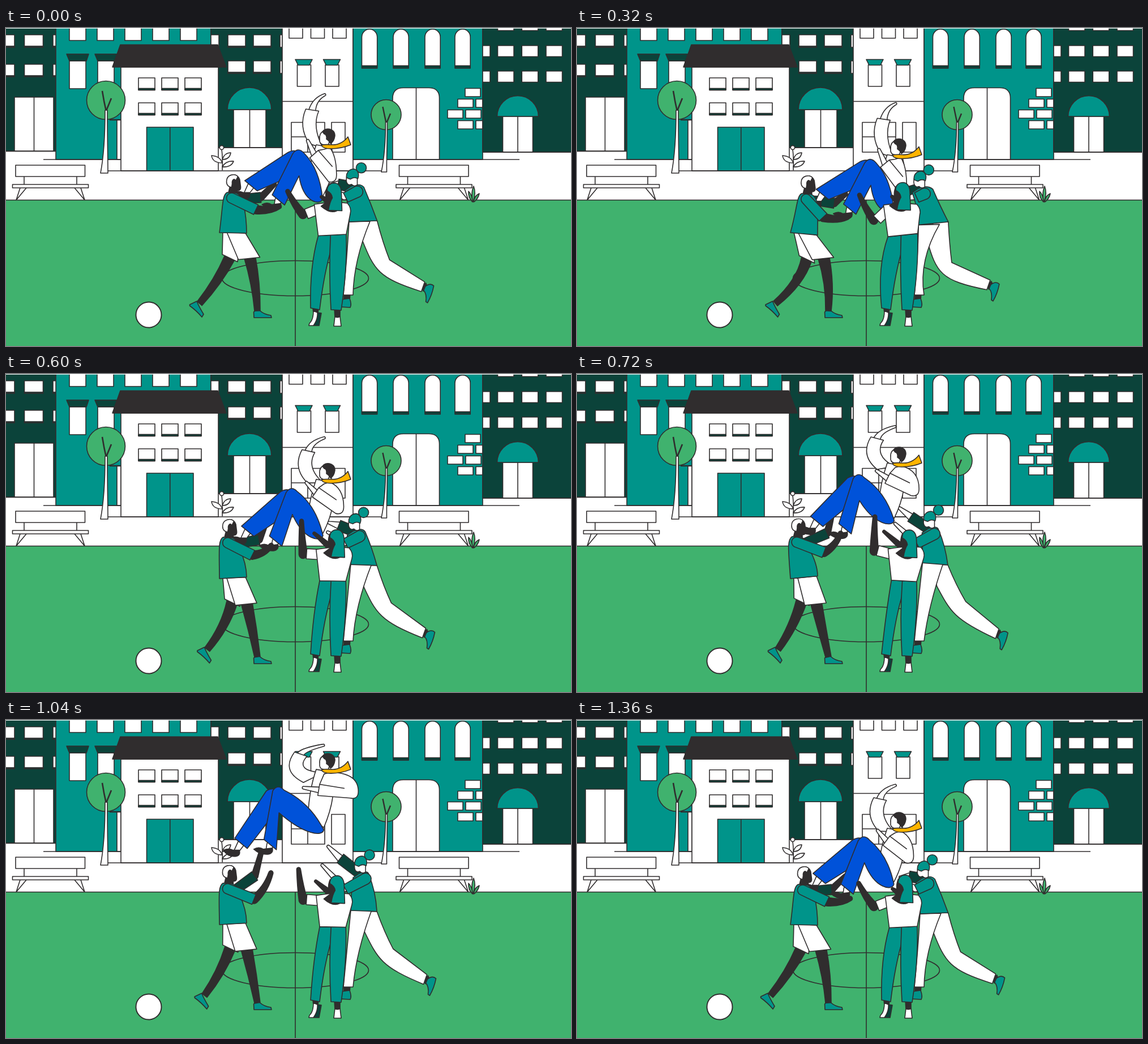
An HTML page that plays this animation: 998 by 561 pixels, repeating every 1.4 s.

```html
<!DOCTYPE html>
<html lang="en">
<head>
<meta charset="utf-8">
<title>Team celebration</title>
<style>
html, body { margin: 0; width: 100%; height: 100%; overflow: hidden; background: #fff; }
svg { display: block; width: 100%; height: 100%; }
path, circle, ellipse { stroke: #302d2e; stroke-width: 1.6; stroke-linejoin: round; }
</style>
</head>
<body>
<svg id="stage" viewBox="0 0 998 561"></svg>
<script>
const stage = document.getElementById('stage');
const WHITE = '#fff', TEAL = '#00948a', DEEP = '#0b433a', DARK = '#302d2e';
const GREEN = '#40b26e', BLUE = '#0052d9', GOLD = '#ffb400';

function node(parent, tag, attrs) {
  const el = document.createElementNS('http://www.w3.org/2000/svg', tag);
  for (const k in attrs) el.setAttribute(k, attrs[k]);
  return parent.appendChild(el);
}
const draw = (fill, d, parent = stage) => node(parent, 'path', { fill, d });
const line = (d, w = 1.6) => node(stage, 'path', { fill: 'none', d, style: `stroke-width:${w}` });
const disc = (fill, cx, cy, r) => node(stage, 'circle', { fill, cx, cy, r });
const box = (fill, x, y, w, h) => draw(fill, `M${x} ${y}h${w}v${h}h${-w}z`);

// Evenly spaced windows, with a dark sill if wanted.
function windows(n, x, gap, y, w, h, sill = 0) {
  for (let i = 0; i < n; i++) {
    box(WHITE, x + i * gap, y, w, h);
    if (sill) box(DEEP, x + i * gap, y + h - sill, w, sill);
  }
}
function door(x, y, w, h, fill = WHITE) {
  box(fill, x, y, w, h);
  line(`M${x + w / 2} ${y}v${h}`);
}
const awning = (x, y, r) => draw(TEAL, `M${x - r} ${y}a${r} ${r} 0 0 1 ${2 * r} 0z`);

function buildings() {
  box(DEEP, -2, -2, 90, 219);
  for (const y of [12, 64]) windows(3, -18, 50.5, y, 33, 22, 2);
  door(15, 122, 69, 95);

  box(TEAL, 88, -2, 274, 234);
  windows(5, 112, 49, -5, 29, 27);
  for (const x of [107, 157]) {
    box(WHITE, x + 5, 58, 29, 49);
    draw(DEEP, `M${x} 46h39l-4 12h-30z`);
  }
  box(WHITE, 196, 162, 7, 70);
  line('M183 162h20', 2.4);
  line('M209 116h3M209 126h3');

  box(DEEP, 362, -2, 126, 213);
  for (const y of [12, 58]) windows(2, 392, 45, y, 31, 22, 2);
  for (const y of [12, 58]) box(WHITE, 484, y, 4, 22);
  box(WHITE, 362, 12, 14, 22);
  door(402, 144, 57, 67);
  awning(430, 144, 39);

  box(WHITE, 203, 69, 172, 183);
  for (const y of [88, 132]) windows(3, 234, 41, y, 29, 21.5, 3);
  door(248.5, 175, 82.5, 77, TEAL);
  draw(DARK, 'M202 29.5H374L389 69H188z');

  box(WHITE, 488, -2, 125, 254);
  windows(3, 500, 38.5, -5, 24, 23);
  for (const x of [511, 560.5]) {
    box(WHITE, x + 3.5, 65, 24, 38);
    draw(TEAL, `M${x} 55.5h30l-5 10h-20z`);
  }
  line('M488 129.5h125');
  box(WHITE, 504, 166.5, 59, 52.5);
  line('M533 166v53M504 192h59');
  box(WHITE, 575, 166.5, 24, 52.5);

  box(TEAL, 613, -2, 229, 234);
  for (const x of [628.5, 684, 740, 793]) {
    draw(WHITE, `M${x} 68v-52a13.6 14 0 0 1 27.2 0v52z`);
    box(DEEP, x, 66.5, 27.2, 4.5);
  }
  draw(WHITE, 'M683 232V124Q683 105.5 702 105.5H747Q765.5 105.5 765.5 124V232z');
  line('M724.5 105.5V232');
  for (let i = 0; i < 4; i++) {
    const y = 106.5 + i * 19, x = [811, 798, 780, 798][i];
    box(WHITE, x, y, 27, 14.5);
    if (i) box(WHITE, x + 32, y, i === 2 ? 27 : 12, 14.5);
  }

  box(DEEP, 842, -2, 158, 221);
  for (const y of [-15, 31, 76]) {
    windows(3, 868.5, 42.75, y, 28.5, 19.5);
    if (y > 0) box(WHITE, 842, y, 13, 19.5);
  }
  door(877.5, 156, 53, 63);
  awning(904, 156, 36.5);
  line('M0 217.5H88M66 232H203M613 232H907M375 211H488M842 219H998M179 252H664');
  node(stage, 'rect', { width: 998, height: 1, fill: WHITE });
}

function garden() {
  disc(GREEN, 176.5, 127.5, 34);
  line('M170 111Q173 130 177 147M186 124L177 146', 2.6);
  draw(WHITE, 'M175 145C175 200 172 230 167 256H180C180 230 179 200 179 145z');
  disc(GREEN, 671.5, 153, 26.5);
  line('M665.5 139L672 170M679 151L672 168', 2.4);
  draw(WHITE, 'M670.500 166C670.500 205 668 230 663 254H672.500C672 230 673.500 205 673.500 166z');

  line('M382 251Q383 230 381 214');
  draw(WHITE, 'M382 238Q365 238 363 225Q378 226 382 238zM382 232Q386 220 397 220Q395 232 382 232zM382 245Q388 234 402 235Q398 246 382 245z');
  disc(WHITE, 381, 211, 3.6);

  box(GREEN, -3, 303.5, 1004, 260);
  for (const x of [0, 677.5]) {
    line(`M${x + 25} 282l-7 21.5l18-21.5M${x + 121} 282l18 21.5l-7-21.5`);
    line(`M${x + 32} 262v14M${x + 125} 262v14`);
    box(WHITE, x + 17, 242, 122.5, 20);
    box(WHITE, x + 11.5, 276, 134, 6);
  }
  draw(GREEN, 'M824 307Q816 299 817 288Q824 295 824 307zM824 306Q821 290 826 279Q831 292 825 306zM826 307Q827 296 836 292Q834 302 826 307z');
  line('M511 303.5V561');
  node(stage, 'ellipse', { fill: 'none', cx: 511, cy: 441.5, rx: 129.5, ry: 31 });
  node(stage, 'circle', { fill: WHITE, cx: 252, cy: 506, r: 22.5, style: 'stroke-width:2' });
}

// ---- motion: a few drivers move everything between a low and a high pose ----
const LOOP = 1400, STEP = 40;
const TIMES = [0, 160, 480, 720, 880, 1200, 1360];
const DRIVERS = {
  reach: [.25, 0, .14, .75, 1, .62, .25], // arms
  rise: [.5, 0, .6, 1.05, 1, .7, .5],     // knees and backs
  wide: [1, .75, 0, 0, 0, .75, 1],        // stance
  fold: [.13, 0, .3, .68, 1, 1.03, .42]   // tossed body
};
const LIFT_TIMES = [0, 160, 480, 720, 880, 1000, 1200, 1360];
const LIFT = [0, 19, 0, -49, -103, -121, -78, -15];

// Smooth periodic curve through uneven keys.
function curve(vals, t, times = TIMES) {
  const n = times.length;
  const val = j => vals[(j + n) % n];
  const at = j => times[(j + n) % n] + LOOP * Math.floor(j / n);
  const slope = j => {
    const a = at(j) - at(j - 1), b = at(j + 1) - at(j);
    return ((val(j) - val(j - 1)) / a * b + (val(j + 1) - val(j)) / b * a) / (a + b);
  };
  let i = n - 1;
  while (times[i] > t) i--;
  const h = at(i + 1) - at(i), u = (t - at(i)) / h, v = 1 - u;
  return val(i) * v * v * (1 + 2 * u) + val(i + 1) * u * u * (3 - 2 * u)
    + h * u * v * (slope(i) * v - slope(i + 1) * u);
}

const off = (p, x, y) => [p[0] + x, p[1] + y];
const mid = (a, b) => [(a[0] + b[0]) / 2, (a[1] + b[1]) / 2];
const mix = (k, x0, y0, x1, y1) => [x0 + (x1 - x0) * k, y0 + (y1 - y0) * k];

const figure = solve => ({ solve, pose: {} });

const man = figure(({ reach, rise, wide }) => {
  const head = mix(rise, 411, 273, 392, 267);
  return {
    head,
    neck: off(head, -6, 20),
    hem: mix(rise, 425, 367, 425, 357),
    cuff: off(mix(rise, 431, 341, 436, 316), 8 * wide, -8 * wide),
    hand: off(mix(reach, 473, 332, 463, 264), 12 * wide, 0),
    farCuff: mix(reach, 454, 308, 438, 272),
    farHand: off(mix(reach, 470, 291, 445, 229), 10 * wide, 0),
    backHem: off(mix(rise, 411, 409, 397, 402), -9 * wide, 0),
    frontHem: mix(rise, 437, 406, 422, 405),
    foot: [13 - 13 * wide, -1]
  };
});

const girl = figure(({ rise, wide }) => ({
  head: mix(rise, 574, 285, 587, 288),
  left: mix(rise, 540, 313, 549, 309),
  right: mix(rise, 604, 315, 612, 309),
  waistL: mix(rise, 548, 369, 555, 364),
  waistR: mix(rise, 602, 362, 600, 366),
  elbow: mix(rise, 520, 347, 521, 317),
  hand: off(mix(rise, 500, 298, 525, 254), -15 * wide, 12 * wide),
  farHand: off(mix(rise, 556, 297, 543, 279), 8 * wide, 10 * wide)
}));

const woman = figure(({ reach, rise, wide }) => {
  const knee = off(mix(rise, 654, 416, 685, 402), 8 * wide, 0);
  const swing = knee[0] - 683;
  return {
    knee,
    swing,
    head: mix(reach, 607, 265, 629, 252),
    shoulder: mix(reach, 629, 284, 642, 272),
    hemL: mix(rise, 602, 350, 610, 334),
    hemR: mix(rise, 656, 343, 655, 337),
    farCuff: mix(reach, 585, 288, 591, 240),
    farHand: mix(reach, 572, 298, 569, 216),
    hand: mix(reach, 577, 300, 557, 252),
    foot: [swing * .62, swing * .2]
  };
});

const arms = figure(({ fold }) => ({
  hand: mix(fold, 563, 112, 561, 156),
  cuffA: mix(fold, 532, 139, 513, 170),
  cuffB: mix(fold, 555, 142, 535, 177),
  bend: mix(fold, 520, 170, 490, 203),
  under: mix(fold, 537, 201, 527, 225),
  elbow: mix(fold, 579, 270, 616, 256),
  cuff: mix(fold, 543, 220, 551, 239),
  palm: mix(fold, 534, 194, 527, 232)
}));

const legs = figure(({ fold }) => ({
  hip: mix(fold, 559, 300, 561, 311),
  knee: mix(fold, 521, 213, 487, 234),
  cuff: mix(fold, 483, 299, 469, 333),
  farKnee: mix(fold, 514, 214, 478, 237),
  farCuff: mix(fold, 435, 271, 418, 327)
}));

// Tapered limb from a to b, bent towards c; the far end is flat or round.
function limb(a, b, wa, wb, c = mid(a, b), round = false) {
  const side = (p, q, w) => {
    const dx = q[0] - p[0], dy = q[1] - p[1], l = Math.hypot(dx, dy) || 1;
    return [-dy / l * w, dx / l * w];
  };
  const na = side(a, c, wa), nb = side(c, b, wb), nc = side(a, b, (wa + wb) / 2);
  const plus = (p, n) => off(p, n[0], n[1]), minus = (p, n) => off(p, -n[0], -n[1]);
  return `M${plus(a, na)}Q${plus(c, nc)} ${plus(b, nb)}`
    + (round ? `A${wb} ${wb} 0 0 0 ${minus(b, nb)}` : `L${minus(b, nb)}`)
    + `Q${minus(c, nc)} ${minus(a, na)}A${wa} ${wa} 0 0 0 ${plus(a, na)}z`;
}
const tip = (a, b, wa, wb, c) => limb(a, b, wa, wb, c, true);

const parts = [];
function part(fig, fill, shape, parent = stage) {
  parts.push({ el: draw(fill, '', parent), pose: fig.pose, shape });
}
// Rigid piece carried by one point of the pose.
function rigid(fig, fill, d, key, parent = stage) {
  parts.push({ el: draw(fill, d, parent), pose: fig.pose, key });
}

buildings();
garden();

// ---- far arms ----
part(man, DARK, p => tip(p.farCuff, p.farHand, 6, 4));
part(man, DEEP, p => limb(off(p.neck, 16, 12), p.farCuff, 8, 9));
part(woman, WHITE, p => tip(p.farCuff, p.farHand, 6, 2.5));
part(woman, DEEP, p => limb(off(p.head, -2, 18), p.farCuff, 9, 9.5));

// ---- tossed player ----
const flyer = node(stage, 'g', {});
part(legs, WHITE, p => limb(p.farCuff, off(p.farCuff, -9, 15), 6, 4), flyer);
rigid(legs, DARK, 'M-3 12Q0 22-10 23Q-24 24-31 12Q-22 8-14 12z', 'farCuff', flyer);
part(legs, BLUE, p => `M${off(p.knee, -4, 42)}L${off(p.farCuff, 11, 9)}L${off(p.farCuff, -11, -9)}`
  + `L${off(p.farKnee, -12, 3)}Q${off(p.farKnee, 0, -4)} ${off(p.farKnee, 8, 3)}z`, flyer);
part(arms, WHITE, p => {
  const m = mid(p.cuffA, p.cuffB);
  return tip(m, p.hand, 6, 2, [m[0] + 4, p.hand[1] + 8]);
}, flyer);
part(arms, WHITE, p => `M${p.cuffA}Q${p.bend} ${p.under}L560 212`
  + `Q${off(p.bend, 24, 0)} ${p.cuffB}z`, flyer);
part(legs, WHITE, p => `M548 206Q536 240 ${off(p.hip, -28, -26)}L${off(p.hip, 0, -4)}Q586 250 575 211z`, flyer);
part(legs, WHITE, p => limb(p.cuff, off(p.cuff, -4, 13), 6, 4), flyer);
rigid(legs, DARK, 'M4 6Q6 16-4 17Q-18 18-29 8Q-20 3-12 8z', 'cuff', flyer);
part(legs, BLUE, p => `M${off(p.cuff, -11, -9)}L${off(p.knee, -10, 6)}Q${off(p.knee, -1, -7)} ${off(p.knee, 10, 5)}`
  + `Q${off(mid(p.knee, p.hip), 16, -10)} ${p.hip}C${off(p.hip, -3, 12)} ${off(p.hip, -34, 9)} ${off(p.knee, 1, 45)}`
  + `L${off(p.cuff, 11, 9)}z`, flyer);
part(arms, WHITE, p => tip(p.cuff, p.palm, 5, 2.5), flyer);
part(arms, WHITE, ({ elbow: e, cuff: c }) => {
  const dx = e[0] - c[0], dy = e[1] - c[1], l = Math.hypot(dx, dy);
  const nx = -dy / l * 10, ny = dx / l * 10, inner = off(c, -nx, -ny);
  return `M${inner}L562 214L572 211Q${off(e, 0, -42)} ${off(e, 0, -9)}`
    + `Q${off(e, 0, 6)} ${off(e, -14, 3)}L${off(c, nx, ny)}L${inner}`
    + `L${off(inner, dx * .62, dy * .62)}L${inner}z`;
}, flyer);
draw(WHITE, 'M563 181Q553 184 554 196Q553 205 561 206L568 209L573 196z', flyer);
draw(DARK, 'M559 183C563 175 581 176 581 190C580 198 577 202 573 204Q570 198 566 196Q567 188 562 187z', flyer);
draw(GOLD, 'M557 207Q560 213 574 213Q592 213 609 206L604 192Q592 207 575 206Q562 205 557 207z', flyer);

// ---- woman ----
draw(DARK, 'M597 469H608L607 480H597z');
draw(TEAL, 'M592 479L607 477Q611 488 608 493L590 492z');
rigid(woman, DARK, 'M738 456L745 451L749 461L740 465z', 'foot');
rigid(woman, TEAL, 'M744 457Q753 450 759 456Q756 472 748 486L745 484Q747 470 741 464z', 'foot');
part(woman, WHITE, ({ hemR, knee, foot, swing }) => `M${off(hemR, -26, 0)}L${hemR}`
  + `Q${off(mid(hemR, knee), -1, 4)} ${knee}L${off(foot, 743, 449)}L${off(foot, 737, 466)}`
  + `C${off(knee, -20, 32)} ${off(knee, -27, 18)} ${633 + swing * .7} 374z`);
part(woman, WHITE, ({ hemL, swing }) => `M${hemL}Q602 410 596 471L613 471`
  + `Q${618 + swing * .7} 410 ${off(hemL, 37, -1)}z`);
part(woman, WHITE, p => tip([598, 297], p.hand, 6, 2.5));
part(woman, TEAL, ({ head, shoulder: s, hemL, hemR }) => `M${off(head, -4, 18)}Q${off(head, 13, 11)} ${s}`
  + `Q${off(s, 12, 28)} ${hemR}L${hemL}Q${off(hemL, 0, -24)} ${off(head, -14, 25)}z`);
part(woman, TEAL, p => limb(off(p.head, 8, 27), [600, 299], 10, 9));
rigid(woman, WHITE, 'M-11 1Q-13 13-6 15L-2 14Q2 19 8 15L8 1z', 'head');
rigid(woman, TEAL, 'M6-15a9 9 0 1 0 18 0a9 9 0 1 0-18 0z', 'head');
rigid(woman, TEAL, 'M-11 2C-12-8-5-13 2-13C9-12 12-4 9 4Q2 0-4 5Q-8 4-11 2z', 'head');

// ---- girl ----
draw(DARK, 'M542 494H552L551 503H543z');
draw(DEEP, 'M550 502L557 503L553 525H543Q551 514 550 502z');
draw(WHITE, 'M543 499L550 502Q551 514 543 525H535L536 521Q543 515 543 499z');
draw(DARK, 'M580 494H590V511H581z');
draw(WHITE, 'M581 509Q585 512 590 509L592 526H579z');
part(girl, TEAL, ({ waistL: l, waistR: r }) => `M${l}Q${545 + (l[0] - 555) * 2.5} 420 538 494L554 497`
  + `Q562 430 576 385L${mid(l, r)}z`);
part(girl, TEAL, ({ waistL: l, waistR: r }) => `M${off(mid(l, r), -3, 0)}L${r}`
  + `Q${off(r, 2, 60)} 592 498L574 497Q570 430 ${off(mid(l, r), -3, 0)}z`);
part(girl, DARK, p => tip(off(p.head, -8, 22), p.farHand, 6, 2.5));
part(girl, DARK, p => {
  const start = off(p.elbow, 4, -3);
  return tip(start, p.hand, 7.5, 3.5, off(mid(start, p.hand), -1, 4));
});
part(girl, WHITE, p => limb(off(p.left, 6, 9), off(p.elbow, 10, -4), 9, 9));
part(girl, WHITE, ({ left, right, waistL, waistR }) => `M${left}Q${off(mid(left, right), 0, -6)} ${off(right, -5, -3)}`
  + `Q${off(right, 3, 6)} ${off(right, 0, 16)}L${waistR}L${waistL}z`);
rigid(girl, DARK, 'M-13-6C-17 4-17 14-12 19L-24 28Q-8 42 4 36L2 0z', 'head');
rigid(girl, TEAL, 'M-13 1C-14-8-8-13 0-13C9-12 12-4 12 6L13 36L-11 35Q-9 21-4 13Q-5 5-13 1z', 'head');

// ---- man ----
rigid(man, TEAL, 'M324.5 489L337 483Q340 491 349 506L346 511Q337 500 324.5 491z', 'foot');
draw(TEAL, 'M438 511L437.5 501Q443 495 449 499Q455 505 468 507L469 511z');
part(man, DARK, p => {
  const ankle = off(p.foot, 342, 487), m = mid(p.backHem, ankle);
  return limb(p.backHem, ankle, 9.5, 5.5, off(m, p.backHem[0] - 389, 2));
});
part(man, DARK, p => {
  const top = off(p.frontHem, 1, -2), ankle = [444, 499];
  return limb(top, ankle, 10, 5, off(mid(top, ankle), 2 + (top[0] - 426) * .6, 0));
});
part(man, WHITE, p => `M383 360L${off(p.backHem, -13, -6)}L${off(p.backHem, 14, 7)}L414 362z`);
part(man, WHITE, p => `M390 360L${off(p.frontHem, -19, 3)}L${off(p.frontHem, 19, -1)}L${off(p.hem, -2, 0)}z`);
rigid(man, DARK, 'M3-11Q12-8 12 2L13 10Q14 17 7 17L7 24L-9 22L-5 6z', 'head');
rigid(man, WHITE, 'M8-8C3-14-12-12-12 1C-12 8-7 11-3 11L-2 5C-3-3 3-6 4 0z', 'head');
part(man, TEAL, ({ neck, hem }) => `M${off(neck, -5, 0)}C${off(neck, -14, 5)} ${off(neck, -12, 22)} 377 361`
  + `L${hem}Q425 335 ${off(neck, 24, 20)}Q${off(neck, 18, 1)} ${off(neck, 9, 1)}z`);
part(man, DARK, p => tip(p.cuff, p.hand, 7.5, 4, off(mid(p.cuff, p.hand), 6, 6)));
part(man, TEAL, p => limb(off(p.neck, 3, 10), p.cuff, 9, 9.5));

function frame() {
  const t = Math.floor(performance.now() % LOOP / STEP) * STEP;
  const now = {};
  for (const k in DRIVERS) now[k] = curve(DRIVERS[k], t);
  for (const f of [man, girl, woman, arms, legs]) Object.assign(f.pose, f.solve(now));
  flyer.setAttribute('transform', `translate(0 ${curve(LIFT, t, LIFT_TIMES)})`);
  for (const { el, pose, shape, key } of parts) {
    if (shape) el.setAttribute('d', shape(pose));
    else el.setAttribute('transform', `translate(${pose[key]})`);
  }
  requestAnimationFrame(frame);
}
frame();
</script>
</body>
</html>
```
